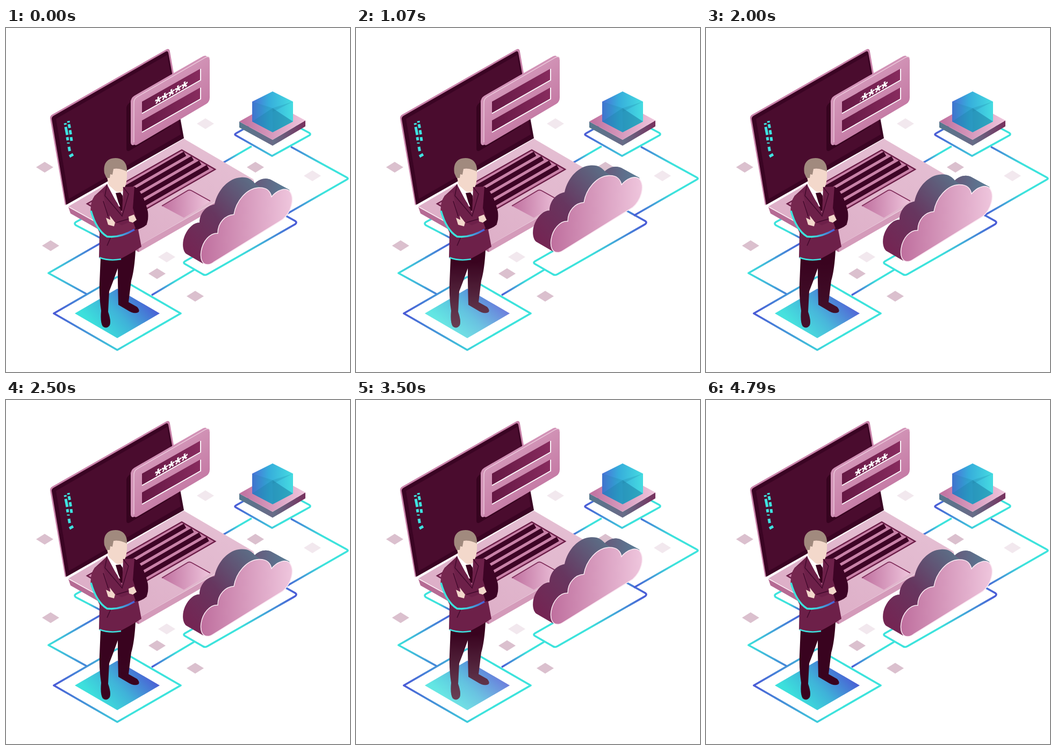
Recreate the animation shown at these times as an HTML page. Size 640 by 640 pixels, loop 4870 ms.

```html
<!DOCTYPE html>
<html lang="en">
<head>
<meta charset="utf-8">
<title>Isometric cloud login</title>
<style>
  html, body { margin: 0; height: 100%; overflow: hidden; background: #fff; }
  svg { display: block; width: 100vw; height: 100vh; }
  .wire { fill: none; stroke-width: 3.6; stroke-linejoin: round; }
  .stars { font: bold 31.5px "Liberation Sans", Arial, sans-serif; fill: #fff; }
  .shine { fill: url(#shineFill); }
</style>
</head>
<body>
<svg viewBox="0 0 640 640">
  <defs>
    <linearGradient id="cyanBlue"><stop stop-color="#3ce3dc"/><stop offset="1" stop-color="#4a5ad6"/></linearGradient>
    <linearGradient id="blueCyan"><stop stop-color="#4a5ad6"/><stop offset=".6" stop-color="#3ce3dc"/></linearGradient>
    <linearGradient id="cyanEnd"><stop offset=".5" stop-color="#3ce3dc"/><stop offset="1" stop-color="#4a5ad6"/></linearGradient>
    <linearGradient id="padFill" x1=".1" y1=".75" x2=".95" y2=".3"><stop offset=".12" stop-color="#3ce0dc"/><stop offset=".5" stop-color="#3fb2d9"/><stop offset="1" stop-color="#4b55d4"/></linearGradient>
    <linearGradient id="cubeFill"><stop stop-color="#4a70d8"/><stop offset=".4" stop-color="#36acdb"/><stop offset="1" stop-color="#45dce1"/></linearGradient>
    <linearGradient id="pinkFace"><stop stop-color="#bf6f9e"/><stop offset="1" stop-color="#efc6dd"/></linearGradient>
    <linearGradient id="dialogFace" x1=".2" y1="0" x2=".8" y2="1"><stop stop-color="#dba6c5"/><stop offset=".45" stop-color="#cd8bb0"/><stop offset="1" stop-color="#bd6a9a"/></linearGradient>
    <linearGradient id="deck" x1="0" y1="1" x2="1" y2="0"><stop stop-color="#dcabc5"/><stop offset="1" stop-color="#e6c2d5"/></linearGradient>
    <linearGradient id="field"><stop stop-color="#651844"/><stop offset="1" stop-color="#872b5e"/></linearGradient>
    <linearGradient id="cloudSide" gradientUnits="userSpaceOnUse" x1="335" y1="410" x2="470" y2="290"><stop stop-color="#742553"/><stop offset=".45" stop-color="#67365f"/><stop offset="1" stop-color="#5b7088"/></linearGradient>
    <linearGradient id="bumpSide"><stop stop-color="#665a7b"/><stop offset="1" stop-color="#587f98"/></linearGradient>
    <linearGradient id="slate"><stop stop-color="#56788e"/><stop offset="1" stop-color="#6a6a87"/></linearGradient>
    <linearGradient id="plum"><stop stop-color="#657089"/><stop offset="1" stop-color="#77305d"/></linearGradient>
    <linearGradient id="shineFill" gradientUnits="userSpaceOnUse" x1="0" x2="0" y1="435" y2="577"><stop stop-color="#fff" stop-opacity="0"/><stop offset=".55" stop-color="#fff" stop-opacity=".17"/><stop offset="1" stop-color="#fff" stop-opacity=".28"/></linearGradient>
    <clipPath id="wipe"><path id="edge" d="M6 -34H120V0H-6Z"/></clipPath>
    <path id="screen" d="M93 169L300 50L325 198L117 318Z"/>
    <clipPath id="screenClip"><use href="#screen"/></clipPath>
    <path id="dialogShape" d="M238 139Q238 132 244 128L369 56Q379 50 379 59V129Q379 137 373 141L246 216Q238 221 238 213Z"/>
    <path id="pad" d="M128 531L207 485L286 531L207 577Z"/>
    <path id="legs" d="M176 428L241 413Q239 450 233 470L228 510L244 519Q250 526 246 529Q238 533 226 525L209 515L208 470V447Q200 470 192 490L190 528Q196 545 193 553Q187 561 180 555Q175 548 177 526Q173 500 174 475Z"/>
  </defs>

  <g id="tiles"></g>

  <g class="wire">
    <path stroke="url(#blueCyan)" d="M89 531L207 463L325 531L207 599Z"/>
    <path stroke="url(#cyanBlue)" d="M150 495L79 456L180 398"/>
    <path stroke="url(#cyanEnd)" d="M150 350L130 361Q126 364 130 367L178 392"/>
    <path stroke="url(#blueCyan)" d="M271 497L350 450"/>
    <path stroke="url(#cyanEnd)" d="M500 339L333 434Q329 437 333 439L366 458Q370 461 375 458L538 365Q542 362 538 359L500 338"/>
    <path stroke="url(#blueCyan)" d="M428 196L495 158L564 195Q568 198 564 200L495 238L428 200Q424 198 428 196Z"/>
    <path stroke="url(#blueCyan)" d="M400 253L457 220"/>
    <path stroke="url(#blueCyan)" d="M530 221L634 278Q638 280 634 282L517 349"/>
  </g>

  <!-- cube on its plate -->
  <path fill="url(#slate)" d="M434 174L496 208V219L434 185Z"/>
  <path fill="url(#plum)" d="M496 208L557 172V183L496 219Z"/>
  <path fill="url(#pinkFace)" d="M434 174L496 139L557 172L496 208Z"/>
  <path fill="url(#cubeFill)" d="M458 137L496 118L534 137V174L496 194L458 174Z"/>
  <g fill="#1c7fa4">
    <path opacity=".35" d="M458 174L496 149V194Z"/>
    <path opacity=".55" d="M534 174L496 149V194Z"/>
    <path opacity=".25" d="M458 137L496 156L534 137L496 149Z"/>
    <path opacity=".2" d="M458 137L496 156V194L458 174Z"/>
  </g>

  <!-- laptop -->
  <path fill="#b56b94" d="M116 333L247 405V417L120 345Z"/>
  <path fill="#d49bba" d="M247 405L461 283V294L247 417Z"/>
  <path fill="url(#deck)" d="M116 332L331 206L461 282L247 405Z"/>
  <path fill="none" stroke="#fbeaf2" stroke-width="1.5" d="M117 333L247 405"/>
  <path fill="#c983aa" d="M82 168Q82 163 86 161L298 40Q304 37 305 44L312 84L110 330Z"/>
  <path fill="#3a0423" d="M85 169Q85 165 89 163L297 44Q301 42 302 46L331 205L112 329Z"/>
  <use href="#screen" fill="#4a0c2e"/>
  <use href="#dialogShape" x="-14" y="11" fill="#36031f" clip-path="url(#screenClip)"/>
  <path fill="none" stroke="#3fe3e0" stroke-width="5" d="M110 177l.6 3M111 184l3 15M114 203l1 6M116 213v2M116 173l.6 3M117 179l1.500 7M119 190l1.500 8M121 203l1 7M117 221l1.500 8M118 239l7-4"/>
  <path fill="#c982a8" stroke="#6d1f49" stroke-width="2.500" d="M151 327L327 227L389 263L213 364Z"/>
  <path id="keys" fill="none" stroke="#3d0425" stroke-width="9"/>
  <path fill="url(#pinkFace)" d="M290 331L341 301L381 322L331 353Z"/>
  <path fill="none" stroke="#82305d" stroke-width="2" d="M290 331L337 303Q341 300 346 303L380 322"/>

  <!-- dialog -->
  <use href="#dialogShape" x="-5" y="-1" fill="#d293b7" stroke="#d293b7" stroke-width="2"/>
  <use href="#dialogShape" fill="url(#dialogFace)"/>
  <path fill="none" stroke="#f0d2e1" stroke-width="1.200" d="M238 213V139Q238 132 244 128L369 56Q379 50 379 59"/>
  <g fill="url(#field)">
    <path d="M253 137L361 76V98L253 158Z"/>
    <path d="M253 172L361 111V132L253 193Z"/>
  </g>
  <path fill="none" stroke="#fff" stroke-width="1.800" d="M253 159L362 97V76M253 194L362 132V111"/>
  <text class="stars" transform="matrix(1 -.571 0 1 277 153)" clip-path="url(#wipe)">*****</text>

  <g id="cloud">
    <path fill="url(#cloudSide)" d="M366 438L335 420C327 412 328 396 333 385C340 370 350 362 360 362C360 345 372 331 388 328C394 300 415 279 437 278C450 277 457 282 463 289C472 280 485 278 494 283L527 301L533 322L500 350L380 438Z"/>
    <path fill="url(#bumpSide)" d="M463 289C472 280 485 278 494 283L527 301C515 297 503 303 494 313Z"/>
    <path fill="url(#pinkFace)" stroke="#fbeaf3" stroke-width="1.500" d="M375 440C365 440 361 430 363 416C366 396 380 381 394 382C394 362 408 348 424 347C428 322 448 298 470 297C485 296 492 304 494 314C505 301 520 296 528 304C538 318 530 343 515 356L386 436Q380 440 375 440Z"/>
  </g>

  <use href="#pad" fill="url(#padFill)"/>
  <use href="#pad" class="shine"/>

  <!-- man -->
  <use href="#legs" fill="#39031f"/>
  <use href="#legs" class="shine"/>
  <path fill="#fff" d="M188 288L207 302L218 302L221 335L211 332L190 300Z"/>
  <path fill="#f3d8cb" d="M188 278L197 262Q210 259 225 266C226 282 223 296 217 303Q210 308 203 303L191 292Z"/>
  <path fill="#a18a7e" d="M183 270C180 250 190 242 204 242C218 242 226 252 225 267Q210 260 200 262L198 273L194 272L193 279L187 279Z"/>
  <path fill="#39031f" d="M204 307L213 306L217 312L218 346L209 324Z"/>
  <path fill="#6d2049" d="M188 291L216 344L218 296L239 295Q254 306 264 345L262 366L246 375L252 407Q235 418 214 429Q190 434 173 427L174 381L158 345Q156 325 165 312Z"/>
  <path fill="#3d0425" d="M239 295Q255 304 264 342Q266 361 259 368Q250 375 238 375L232 362L243 357L236 335Z"/>
  <path fill="#76274f" d="M165 312L180 305L189 345L187 353L215 367L236 359L241 373Q210 389 190 386Q175 382 158 345Q156 325 165 312Z"/>
  <path fill="none" stroke="#430a2d" stroke-width="1.500" d="M188 291L184 312L216 350L228 309L218 296M181 322L190 350M205 362L239 352M195 389L188 405"/>
  <path fill="#f3d8cb" d="M186 353L194 357L193 349L203 362L201 369L190 366ZM228 351L238 347L243 357L236 362L229 360Z"/>
  <path fill="none" stroke="url(#cyanEnd)" stroke-width="3.500" d="M158 340Q168 376 188 388Q212 391 239 375"/>
  <path fill="none" stroke="#3fe0de" stroke-width="2.500" d="M174 427Q192 434 214 430"/>
</svg>
<script>
  const LOOP = 4870, CYCLE = 2390, LIFT = 23, WIPE = 73;
  const el = id => document.getElementById(id);
  const shines = document.querySelectorAll('.shine');

  const diamonds = (color, spots) => spots.map(([x, y]) =>
    `<path fill="${color}" d="M${x - 16} ${y}l16 -10l16 10l-16 10z"/>`).join('');
  el('tiles').innerHTML =
    diamonds('#dbc0ce', [[72, 259], [83, 405], [281, 457], [352, 499], [464, 259]]) +
    diamonds('#f2e8ee', [[371, 178], [570, 275], [299, 426]]);

  el('keys').setAttribute('d', [0, 1, 2, 3].map(i =>
    `M${165 + 14.2 * i} ${331 + 8.2 * i}l168 -97`).join(''));

  function draw(now) {
    const t = Math.min(now % LOOP, 2 * CYCLE);
    const p = (1 - Math.cos(2 * Math.PI * t / CYCLE)) / 2;
    el('cloud').setAttribute('transform', `translate(0 ${-LIFT * p})`);
    el('edge').setAttribute('transform', `translate(${WIPE * p - 6} 0)`);
    shines.forEach(shine => shine.setAttribute('opacity', p));
    requestAnimationFrame(draw);
  }
  requestAnimationFrame(draw);
</script>
</body>
</html>
```
